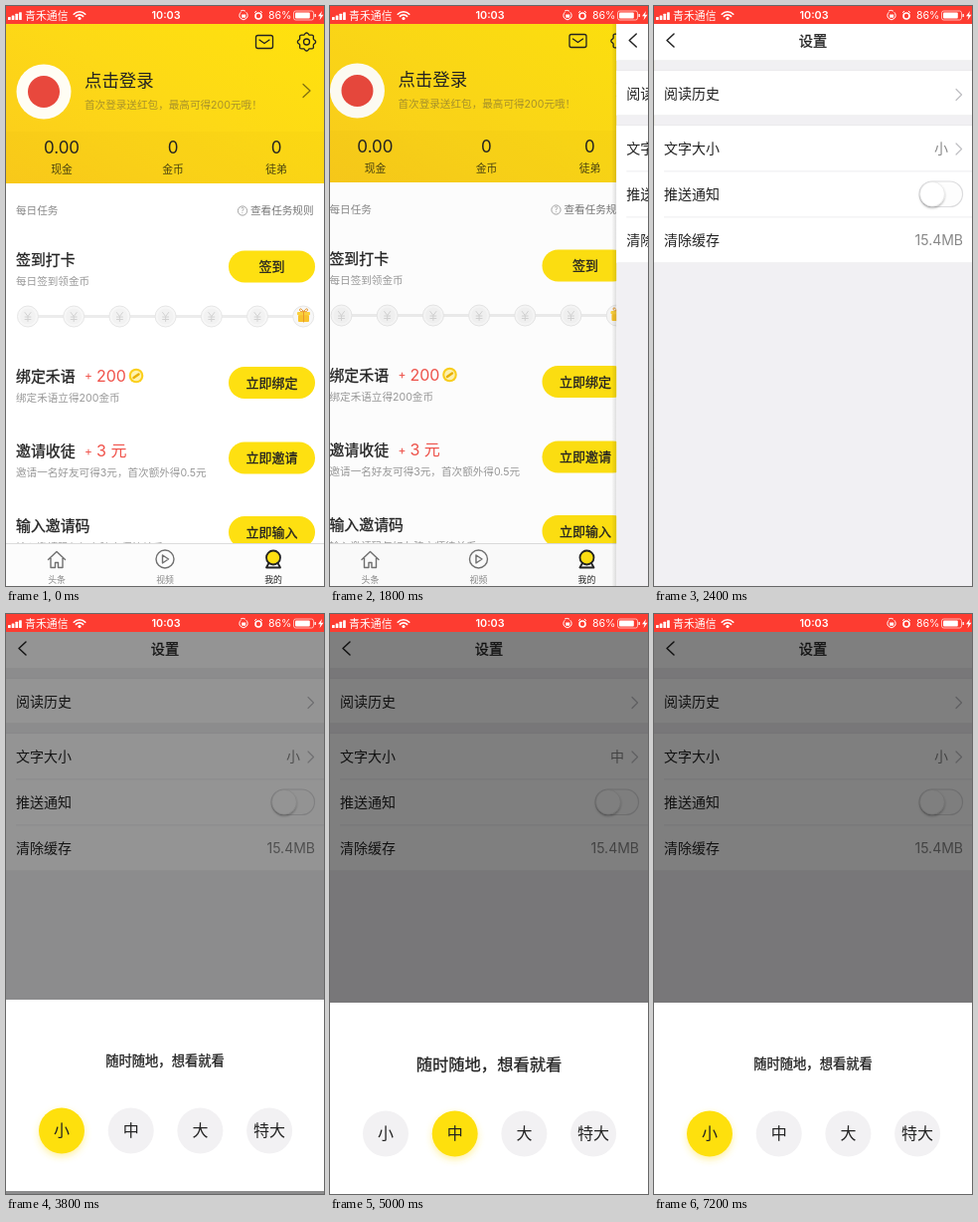
An HTML page for the animation above (8 s loop, 320 px wide and 582 px high).

```html
<!DOCTYPE html>
<html lang="zh-CN">
<head>
<meta charset="utf-8">
<title>设置</title>
<style>
  html, body { margin: 0; width: 100%; height: 100%; overflow: hidden; background: #fff; }
  svg { display: block; width: 100%; height: 100%; }
  text { font-family: Inter, "Noto Sans CJK SC", "Noto Sans CJK", sans-serif; white-space: pre; }
  .medium { stroke: #222; stroke-width: .3px; }
</style>
</head>
<body>
<svg id="stage" viewBox="0 0 320 582">
  <defs>
    <linearGradient id="gold" x1="0" y1="1" x2="1" y2="0">
      <stop offset="0" stop-color="#fbcb1c"/>
      <stop offset=".5" stop-color="#fdd916"/>
      <stop offset="1" stop-color="#ffe30c"/>
    </linearGradient>
    <linearGradient id="edge">
      <stop offset="0" stop-opacity="0"/>
      <stop offset="1" stop-opacity=".12"/>
    </linearGradient>
    <filter id="glow" x="-50%" y="-50%" width="200%" height="200%">
      <feDropShadow dx="0" dy="3" stdDeviation="3.5" flood-color="#ffe030" flood-opacity=".45"/>
    </filter>
    <filter id="soft" x="-50%" y="-50%" width="200%" height="200%">
      <feDropShadow dx="0" dy="1.5" stdDeviation="1.2" flood-opacity=".3"/>
    </filter>
  </defs>
  <g id="home"></g>
  <rect id="homeShade" width="320" height="582" opacity="0"/>
  <g id="settings"></g>
  <rect id="dim" width="320" height="582" opacity="0"/>
  <g id="sheet"></g>
  <g id="status"></g>
</svg>
<script>
const $ = id => document.getElementById(id);
const INK = '#222', GREY = '#999', YELLOW = '#fee011', TAB = '#707070', MEDIUM = 'class="medium"';

// Text is placed by the vertical middle of its glyphs.
const text = (x, y, size, str, fill = INK, anchor = 'start', extra = '') =>
  `<text x="${x}" y="${y + size * .37}" font-size="${size}" fill="${fill}" text-anchor="${anchor}" ${extra}>${str}</text>`;
const mid = (x, y, size, str, fill, extra) => text(x, y, size, str, fill, 'middle', extra);
const rect = (x, y, w, h, fill, extra = '') =>
  `<rect x="${x}" y="${y}" width="${w}" height="${h}" fill="${fill}" ${extra}/>`;
const circle = (x, y, r, fill, extra = '') =>
  `<circle cx="${x}" cy="${y}" r="${r}" fill="${fill}" ${extra}/>`;
const line = (d, stroke = INK, width = 1.3, extra = '') =>
  `<path d="${d}" fill="none" stroke="${stroke}" stroke-width="${width}" stroke-linecap="round" stroke-linejoin="round" ${extra}/>`;
const button = (y, label) =>
  rect(224, y - 16, 87, 32, YELLOW, 'rx="16"') + mid(267.5, y, 13, label, INK, MEDIUM);
const chevron = (x, y, w, h, color, width) =>
  line(`M${x} ${y - h}l${w} ${h}l${-w} ${h}`, color, width);

function task(y, title, note, label, reward = '') {
  return text(10, y, 14.9, title, INK, 'start', MEDIUM) +
    text(10, y + 22, 10.6, note, GREY) + button(y + 7, label) +
    (reward && text(79, y, 12, '+', '#f0524a') + text(91, y, 16, reward, '#f0524a'));
}

function gear(x, y) {
  const points = Array.from({ length: 48 }, (_, i) => {
    const a = i / 48 * 2 * Math.PI, r = 8.3 + .9 * Math.cos(a * 8);
    return `${x + r * Math.cos(a)} ${y + r * Math.sin(a)}`;
  });
  return line(`M${points.join('L')}Z`) + circle(x, y, 3, 'none', `stroke="${INK}" stroke-width="1.3"`);
}

function checkIns() {
  let out = rect(22, 310, 277, 3, '#ececec');
  for (let i = 0; i < 7; i++) {
    const x = 22 + i * 46.2;
    out += circle(x, 311.5, 10.5, '#f7f7f7', 'stroke="#e6e6e6"');
    if (i < 6) out += circle(x, 311.5, 8, '#f2f2f2') +
      line(`M${x - 3} 307.500l3 4l3 -4M${x} 311.500v5M${x - 3} 312h6M${x - 3} 314.500h6`, '#d2d2d2', 1);
  }
  return out + rect(294, 310, 11, 7, '#f8c32c', 'rx="1"') + rect(293, 307, 13, 3.2, '#fad03c', 'rx="1"') +
    line('M299.500 307v10M299.500 306.500q-4 -5 -4 -1q1 2 4 1q4 -5 4 -1q-1 2 -4 1', '#e8982c', 1);
}

$('home').innerHTML = rect(0, 0, 320, 582, '#fff') + '<g id="page">' +
  rect(0, 0, 320, 178, 'url(#gold)') + rect(0, 126, 320, 52, '#c79a00', 'opacity=".06"') +
  rect(251.5, 29.5, 17, 13, 'none', `rx="2" stroke="${INK}" stroke-width="1.3"`) +
  line('M255 34l5 3.500l5 -3.500') + gear(302.5, 36) +
  circle(38, 86, 27.5, '#fffdf4') + circle(38, 86, 16, '#e8483d') +
  text(79, 75, 17.4, '点击登录') +
  text(79, 99, 10.6, '首次登录送红包，最高可得200元哦！', '#a8922a') +
  chevron(299, 85, 7, 6.5, '#7d6d12', 1.2) +
  [[56, '0.00', '现金'], [168, '0', '金币'], [272, '0', '徒弟']].map(([x, n, label]) =>
    mid(x, 142, 17, n) + mid(x, 164, 10.8, label, '#4a430f')).join('') +
  text(10, 205.5, 10.6, '每日任务', '#888') +
  circle(238, 205.5, 4.6, 'none', 'stroke="#999" stroke-width=".9"') + mid(238, 205.5, 7, '?', GREY) +
  text(246, 205.5, 10.6, '查看任务规则', '#777') +
  task(254.5, '签到打卡', '每日签到领金币', '签到') + checkIns() +
  task(371, '绑定禾语', '绑定禾语立得200金币', '立即绑定', '200') +
  circle(131, 371, 7.3, '#fbcf1c') + circle(131, 371, 5.2, '#fff3b0') +
  line('M128.500 373l5 -3.500', '#eab100', 2.4) +
  task(446.5, '邀请收徒', '邀请一名好友可得3元，首次额外得0.5元', '立即邀请', '3 元') +
  task(521, '输入邀请码', '输入邀请码与好友建立师徒关系', '立即输入') + '</g>' +
  rect(0, 539, 320, 43, '#fcfcfc') + rect(0, 539, 320, 1, '#dcdcdc') +
  line('M42.500 555.500l8.500 -8l8.500 8M45 554v9.500h4.500v-5h3v5h4.500v-9.500', TAB, 1.4) +
  circle(160, 555, 9, 'none', `stroke="${TAB}" stroke-width="1.4"`) +
  line('M157.500 551v8l6 -4Z', TAB, 1.4) +
  circle(269, 553.5, 7, YELLOW, `stroke="${INK}" stroke-width="1.8"`) +
  line('M264.500 559l-2.500 4.500h14l-2.500 -4.500', INK, 1.8) +
  mid(51, 576, 8.9, '头条', '#888') + mid(160, 576, 8.9, '视频', '#888') + mid(269, 576, 8.9, '我的', INK);

$('settings').innerHTML = rect(-5, 0, 5, 582, 'url(#edge)') + rect(0, 0, 320, 582, '#f1f0f3') +
  rect(0, 0, 320, 55, '#fff') + rect(0, 65, 320, 45, '#fff') + rect(0, 120, 320, 138, '#fff') +
  [55, 65, 110, 120, 258].map(y => rect(0, y - .5, 320, .6, '#e6e6e8')).join('') +
  [165.5, 211.5].map(y => rect(10, y, 310, .8, '#e9e9eb')).join('') +
  chevron(20, 34.5, -7, 6.5, INK, 1.5) +
  mid(160, 35, 14.2, '设置', INK, MEDIUM) +
  ['阅读历史', '文字大小', '推送通知', '清除缓存'].map((s, i) => text(10, [88, 142.5, 188.5, 235][i], 14, s)).join('') +
  chevron(304, 89, 5.5, 5.5, '#bebec2', 1.2) + chevron(304, 143.5, 5.5, 5.5, '#bebec2', 1.2) +
  text(296, 142.5, 14, '小', '#888', 'end', 'id="value"') +
  rect(267, 176, 43.5, 25.5, '#fdfdfd', 'rx="12.75" stroke="#dcdcde" stroke-width="1.2"') +
  circle(280, 188.7, 12.3, '#fff', 'filter="url(#soft)" stroke="#ddd" stroke-width=".5"') +
  text(311, 235, 14, '15.4MB', '#888', 'end');

const SIZES = ['小', '中', '大', '特大'];
$('sheet').innerHTML = rect(0, 390, 320, 192, '#fff') +
  mid(160, 451.5, 13.3, '随时随地，想看就看', INK, `id="slogan" ${MEDIUM}`) +
  SIZES.map((s, i) => {
    const x = 56 + i * 69.7;
    return `<g id="size${i}">${circle(x, 521.5, 23, '#f2f1f3')}${mid(x, 521, 16, s)}</g>`;
  }).join('');

const arc = (r, w) => line(`M${74 - r * .72} ${14 - r * .72}A${r} ${r} 0 0 1 ${74 + r * .72} ${14 - r * .72}`, '#fff', w);
$('status').innerHTML = rect(0, 0, 320, 18, '#fd3c31') +
  [0, 1, 2, 3].map(i => rect(2 + i * 3.7, 11 - i * 1.6, 2.7, 3 + i * 1.6, '#fff', 'rx=".5"')).join('') +
  text(19, 9.5, 10.9, '青禾通信', '#fff') + arc(8, 1.6) + arc(5, 1.6) + circle(74, 12.5, 1.6, '#fff') +
  mid(161, 9.5, 10.8, '10:03', '#fff', 'font-weight="600"') +
  line('M236 6.500a4.200 4.200 0 1 0 6 0M236.500 4.800a4.200 4.200 0 0 1 4 .1', '#fff', 1) + rect(237.2, 8.5, 4, 3.2, '#fff') +
  circle(254, 10, 3, 'none', 'stroke="#fff" stroke-width="1.6"') +
  line('M250.300 6.500l1.500 -1.300M257.700 6.500l-1.500 -1.300', '#fff', 1) +
  text(264, 9.5, 10.6, '86%', '#fff') +
  rect(289.5, 5, 20, 9, 'none', 'rx="2" stroke="#fff" stroke-width=".9" stroke-opacity=".7"') +
  rect(291, 6.5, 14.8, 6, '#fff', 'rx="1"') + rect(310.5, 8, 1.3, 3, '#fff') +
  '<path d="M318 5l-4 5.200h2.500l-1 4l4 -5.400h-2.500z" fill="#fff"/>';

const LOOP = 8000, STEP = 200;
const PUSH_START = 1771, SHEET_START = 3800;
const TAPS = [ // [press time, release time, size index]
  [4600, 4800, 1], [5200, 5400, 2], [6000, 6200, 3], [6800, 7000, 0]
];

// Critically damped spring of the system screen transition.
function spring(ms) {
  const k = Math.max(0, ms) / 1000 * 18.26;
  return 1 - (1 + k) * Math.exp(-k);
}

function render(t) {
  const push = spring(t - PUSH_START);
  $('home').setAttribute('transform', `translate(${-106 * push})`);
  $('page').setAttribute('transform', `translate(0 ${push ? -1 : 0})`);
  $('homeShade').setAttribute('opacity', .1 * push);
  $('settings').setAttribute('transform', `translate(${320 * (1 - push)})`);
  $('settings').setAttribute('visibility', push ? 'visible' : 'hidden');

  const open = t >= SHEET_START, settling = open && t < SHEET_START + STEP;
  $('dim').setAttribute('opacity', open ? (settling ? .42 : .5) : 0);
  $('sheet').setAttribute('transform', `translate(0 ${open ? (settling ? -3 : 0) : 200})`);

  let selected = 0, pressed = -1;
  for (const [down, up, index] of TAPS) {
    if (t >= up) selected = index;
    else if (t >= down) pressed = index;
  }
  const sloganSize = 13.3 + selected * 3;
  $('value').textContent = SIZES[selected];
  $('slogan').setAttribute('font-size', sloganSize);
  $('slogan').setAttribute('y', 451.5 + sloganSize * .37);
  SIZES.forEach((_, i) => {
    const on = i === selected, group = $('size' + i), disc = group.firstChild;
    group.setAttribute('opacity', i === pressed ? .22 : 1);
    disc.setAttribute('fill', on ? YELLOW : '#f2f1f3');
    disc.setAttribute('filter', on ? 'url(#glow)' : 'none');
  });
}

const start = performance.now();
function tick() {
  const t = (performance.now() - start) % LOOP;
  render(Math.floor(t / STEP) * STEP);
  requestAnimationFrame(tick);
}
tick();
</script>
</body>
</html>
```
